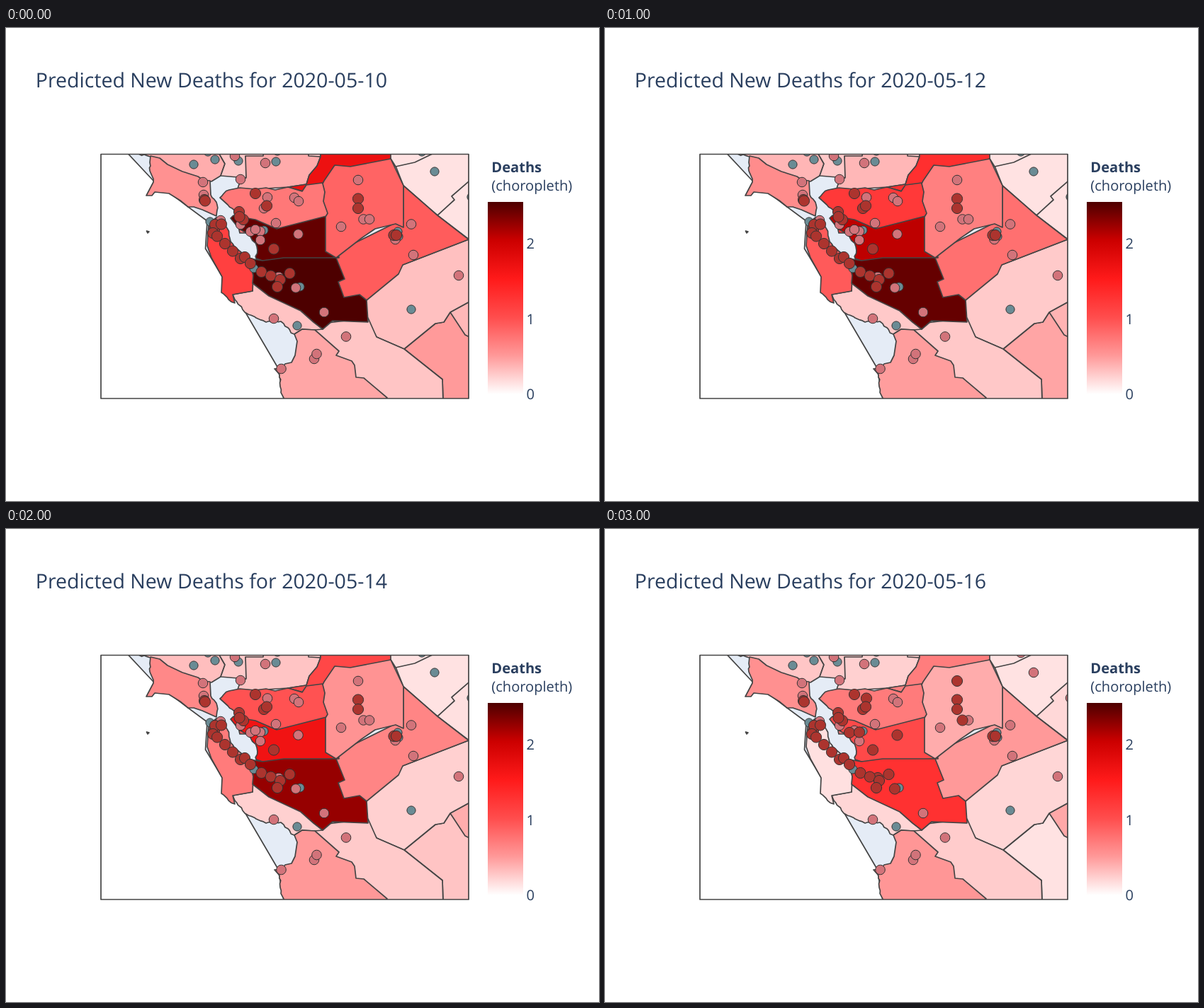
Animation of 837 by 669 pixels, one loop 3.5 s. Source, as an HTML page:

```html
<!DOCTYPE html>
<html lang="en">
<head>
<meta charset="utf-8">
<title>Predicted New Deaths</title>
<style>
  html, body { margin: 0; width: 100%; height: 100%; overflow: hidden; background: #fff; }
  svg { display: block; }
  text { font: 20.1px "Open Sans", sans-serif; fill: #2a3f5f; text-rendering: geometricPrecision; }
  #title { font-size: 28.54px; }
  .bold { font-weight: 700; }
  .line { stroke: #444; stroke-width: 1.7; stroke-linejoin: round; }
  #dots { stroke: #333; }
</style>
</head>
<body>
<svg width="837" height="669" viewBox="0 0 837 669">
  <defs>
    <clipPath id="frame"><rect x="134" y="178.5" width="519" height="345.5"/></clipPath>
    <linearGradient id="scale" x1="0" y1="1" x2="0" y2="0"></linearGradient>
  </defs>
  <text id="title" x="41.85" y="83.5"></text>
  <g clip-path="url(#frame)">
    <rect x="134" y="178" width="519" height="346" fill="#e5ecf6"/>
    <g id="land" class="line"></g>
    <g id="dots"></g>
  </g>
  <rect class="line" x="134" y="178.5" width="519" height="345.5" fill="none"/>
  <rect x="680" y="246" width="50" height="272" fill="url(#scale)"/>
  <text class="bold" x="685.3" y="204">Deaths</text>
  <text x="685.3" y="230">(choropleth)</text>
  <g id="ticks"></g>
</svg>
<script>
const $ = id => document.getElementById(id);
const add = (parent, tag, attrs) => {
  const el = document.createElementNS('http://www.w3.org/2000/svg', tag);
  for (const k in attrs) el.setAttribute(k, attrs[k]);
  return parent.appendChild(el);
};
const mix = (a, b, t) => a + (b - a) * t;

// Colour bar
const stops = ['#fff', '#f99', '#ff4d4d', '#ff1a1a', '#c00', '#4d0000'];
stops.forEach((c, i) => add($('scale'), 'stop', { offset: i / 5, 'stop-color': c }));
for (let n = 0; n < 3; n++) add($('ticks'), 'text', { x: 734.5, y: 525 - 106.3 * n }).textContent = n;

function shade(level) {
  const i = Math.min(4, Math.floor(level * 5));
  return `color-mix(in srgb, ${stops[i + 1]} ${(level * 5 - i) * 100}%, ${stops[i]})`;
}

// "~x,y" reaches that point along a rugged coast
let seed = 7;
const jitter = size => ((seed = seed * 16807 % 2147483647) / 2147483647 - 0.5) * size;
function outline(spec) {
  const out = [];
  let px, py;
  for (const word of spec.split(' ')) {
    const [x, y] = word.replace('~', '').split(',').map(Number);
    const n = word[0] === '~' ? Math.ceil(Math.hypot(x - px, y - py) / 5) : 1;
    for (let i = 1; i < n; i++)
      out.push([mix(px, x, i / n) + jitter(3), mix(py, y, i / n) + jitter(3)]);
    out.push([px = x, py = y]);
  }
  return `M${out.join(' ')}Z`;
}

// Keys are "day:level"; days between are interpolated
function levelAt(keys, day) {
  const k = keys.split(' ').map(s => s.split(':').map(Number));
  const i = Math.max(1, k.findIndex(([d]) => d >= day));
  const [d0, a] = k[i - 1], [d1, b] = k[i];
  return mix(a, b, (day - d0) / (d1 - d0));
}

// Painted back to front: each county hides the loose ends of those before it
const counties = [];
const area = (spec, fill) => add($('land'), 'path', { d: outline(spec), fill });
const county = (keys, spec) => counties.push({ keys, el: area(spec) });

area('120,170 165,170 208,216 257,253 284,273 281.5,312 305,351 339,404 384,481 393,530 120,530', '#fff');
area('198.5,287 202,288 200,290', '#8a2020');

county('0:.057 6:.057', '540,170 660,170 660,310 609,265 561,223');
county('0:.057 6:.057', '540,170 606,176 577,190 550,196 540,180');
county('0:.055 4:.06 6:.077', '660,211 629,238 633,243 609,265 660,304');
county('0:.198 2:.176 6:.057', '562,454 606,418 618,416 627,402 660,402 660,530 617,530 616,497');
county('0:.14 6:.17', '660,384 627,402 648,434 660,440');
county('0:.123 1:.11 6:.08', '500,380 560,335 660,296 660,384 627,402 618,416 606,418 562,454 523,437 511,416');
county('0:.113 6:.1', '430,420 511,410 523,437 562,454 616,497 617,530 480,530');
county('0:.118 6:.08', '320,377 348,372 348,340 447,426 436,427 418,426 407,433 ~388,415 ~367,416 ~337,402 ~323,384');
county('0:.175 3:.2 6:.207', '436,427 470,457 466,463 488,471 492,477 494,494 505,495 538,523 530,530 393,530 ~387,507 ~386,490 379,482 389,481 394,475 403,473 408,463 411,443 407,433 418,426');
county('0:.36 6:.2', '460,320 561,270 561,223 609,265 653,299 560,335 554,348 509,385 460,385');
county('0:.16 6:.112', '187,178 ~207,183 240,215 290,217 303,209 309,192 301,178');
county('0:.11 6:.105', '301,178 301,170 444,170 444,182 338,182 341,182 339,212 303,209 309,192');
county('0:.165 6:.092', '338,181 363,181 364,170 427,170 427,181 444,182 439,195 428,208 424,221 398,225 352,228 327,227 329,221 331,213 339,212');
county('0:.222 5:.25 6:.225', '204,181 217,184 228,193 249,203 271,210 278,215 288,216 289,236 ~298,250 ~297,266 277,257 265,253 257,253 246,244 230,234 210,232 206,237 198,237 208,218 ~203,202 ~203,190');
county('0:.67 1:.537 3:.5 6:.275', '444,182 444,170 543,170 543,185 464,230 420,231 398,225 424,221 428,208 439,195');
county('0:.287 1:.514 3:.44 6:.28', '302,240 ~315,229 330,226 352,228 367,226 380,229 398,225 418,231 424,222 447,219 460,240 460,290 330,290 324,262 ~313,250');
county('0:.963 1:.867 3:.777 6:.415', '317,269 321,265 335,268 352,271 382,284 460,264 470,325 362,329 353,326 ~354,309 ~344,293 329,284');
county('0:.34 1:.292 6:.163', '449,216 464,194 486,196 543,185 561,223 561,282 550,277 521,284 502,297 466,325 451,316 451,267 454,262 448,245 450,232 447,220');
county('0:.45 4:.28 6:.06', '286,277 297,268 308,270 ~310,280 ~322,309 345,328 349,350 348,372 320,377 323,389 ~304,374 305,352 290,325 284,308');
county('0:1 1:1 4:.885 6:.51', '345,333 350,327 362,329 392,325 466,325 478,355 469,359 477,381 499,377 509,385 511,416 461,414 447,426 434,416 416,400 371,379 348,361 349,350');

// Dots rise one kind on the day after "@"; "a>b*n" is an even run of n
const kinds = [
  { r: 6.1, fill: '#6a8b94' },
  { r: 6.8, fill: '#d2737a' },
  { r: 7.6, fill: '#ac342e' }
];
const dots = [];
function scatter(kind, list) {
  for (const word of list.split(' ')) {
    const [place, rise = Infinity] = word.split('@');
    const [run, n = 1] = place.split('*');
    const [a, b = a] = run.split('>').map(p => p.split(',').map(Number));
    for (let i = 0; i < n; i++) {
      const t = i / Math.max(1, n - 1);
      dots.push({ kind, rise, cx: mix(a[0], b[0], t), cy: mix(a[1], b[1], t) });
    }
  }
}
scatter(0, '265,193 295,186 285,175 328,188 381,189 383,174 288,274 364,286 346,332>350,340*2 415,366 411,421 572,398 553,288>554,295*2 587,175@6 605,203@6 657,239@6');
scatter(1, '323,181 331,214 366,191 278,218>279,236*2 364,255@2 369,239.5@5 407,240>413,245*2 381,276 331,278 345,288@5 359,287.5@6 352,285 359,300 412.5,291.5@5 473,281 497,215@6 504.5,270.5@6 513,270.5 572,277.5 575,321 549.5,299 639,350 449,402 409,367.5@5 385,352@6 378,411 480,436.5 435,468>438.5,461*2 388.5,482 303,272');
scatter(2, '280,243>281,244.5*2 352,234 368,251.5 497,241.5>497,255*2 335,271 329,260>329.5,267*2 294,285 295,278>304,277.5*2 292,290 298,294.5>331,326*4 337,324 345,333 378,312.5 360.5,345>387,356*3 383,366 400.5,347 547.5,293>551,293*2');

function draw(day) {
  $('title').textContent = `Predicted New Deaths for 2020-05-${10 + day}`;
  for (const c of counties) c.el.setAttribute('fill', shade(levelAt(c.keys, day)));
  $('dots').replaceChildren();
  kinds.forEach((style, k) => {
    for (const { kind, rise, cx, cy } of dots)
      if (kind + (day >= rise) === k) add($('dots'), 'circle', { cx, cy, ...style });
  });
}

let shown = -1;
const start = performance.now();
function tick() {
  const day = Math.floor((performance.now() - start) / 500) % 7;
  if (day !== shown) draw(shown = day);
  requestAnimationFrame(tick);
}
tick();
</script>
</body>
</html>
```
